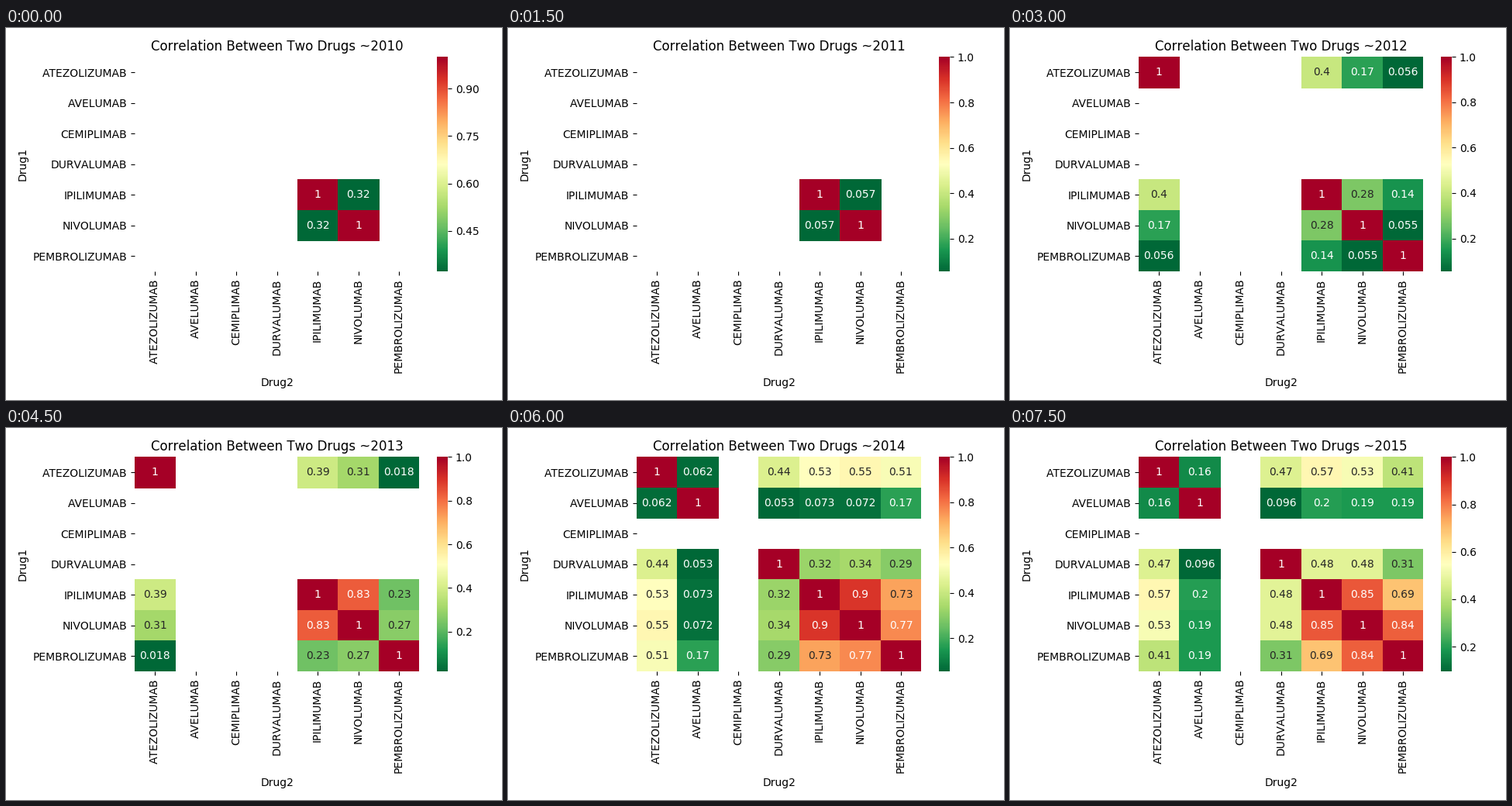
A matplotlib script for the animation above (8000 ms loop, 640 by 480 pixels).

```python
from itertools import combinations

import matplotlib.pyplot as plt
import numpy as np
from matplotlib.animation import FuncAnimation
from matplotlib.ticker import MaxNLocator

W, H, DPI = 640, 480, 100
INTERVAL, FRAMES, HOLD = 500, 16, 3
FIRST_YEAR = 2010

# Each drug with the year it enters the table (None: not yet).
SINCE = {"ATEZOLIZUMAB": 2012, "AVELUMAB": 2014, "CEMIPLIMAB": None,
         "DURVALUMAB": 2014, "IPILIMUMAB": 2010, "NIVOLUMAB": 2010,
         "PEMBROLIZUMAB": 2012}
DRUGS = list(SINCE)
N = len(DRUGS)

# Correlation of every pair of drugs in use, year by year.
PAIRS = [
    [.322],
    [.0567],
    [.4, .17, .056, .28, .14, .055],
    [.39, .31, .018, .83, .23, .27],
    [.062, .44, .53, .55, .51, .053, .073, .072, .17, .32, .34, .29,
     .9, .73, .77],
    [.16, .47, .57, .53, .41, .096, .2, .19, .19, .48, .48, .31,
     .85, .69, .84],
]


def matrix(year):
    used = [i for i, y in enumerate(SINCE.values()) if y and y <= year]
    m = np.full((N, N), np.nan)
    m[used, used] = 1
    for (a, b), v in zip(combinations(used, 2), PAIRS[year - FIRST_YEAR]):
        m[a, b] = m[b, a] = v
    return np.ma.masked_invalid(m)


def luminance(rgba):
    c = np.array(rgba[:3])
    lin = np.where(c <= .03928, c / 12.92, ((c + .055) / 1.055) ** 2.4)
    return lin @ [.2126, .7152, .0722]


def add_axes(left, right, top=37.4, bottom=313.95):
    return fig.add_axes([left / W, 1 - bottom / H,
                         (right - left) / W, (bottom - top) / H])


plt.rcParams["font.family"] = "DejaVu Sans"
plt.rcParams["text.kerning_factor"] = 6
fig = plt.figure(figsize=(W / DPI, H / DPI), dpi=DPI)
ax = add_axes(166, 533.2)
cax = add_axes(556.1, 570)

mesh = ax.pcolormesh(matrix(FIRST_YEAR), cmap="RdYlGn_r", edgecolors="face",
                     linewidth=72 / DPI, antialiased=False)
ax.set(xlim=(0, N), ylim=(N, 0), xlabel="Drug2", ylabel="Drug1")
centres = np.arange(N) + .5
ax.set_xticks(centres, DRUGS, rotation=90)
ax.set_yticks(centres, DRUGS)
ax.spines[:].set_visible(False)
title = ax.set_title("")
notes = {(r, c): ax.text(c + .5, r + .5, "", ha="center", va="center")
         for r in range(N) for c in range(N)}

bar = fig.colorbar(mesh, cax=cax, ticks=MaxNLocator(6))
bar.outline.set_linewidth(0)


def draw(i):
    year = FIRST_YEAR + i // HOLD
    table = matrix(year)
    mesh.set_array(table)
    mesh.set_clim(table.min(), table.max())
    title.set_text(f"Correlation Between Two Drugs ~{year}")
    for cell, note in notes.items():
        v = table[cell]
        if v is np.ma.masked:
            note.set_text("")
        else:
            note.set_text(f"{v:.2g}")
            note.set_color(".15" if luminance(mesh.to_rgba(v)) > .408 else "w")


anim = FuncAnimation(fig, draw, frames=FRAMES, interval=INTERVAL,
                     init_func=lambda: draw(0), repeat=True, repeat_delay=0)
plt.show()
```
